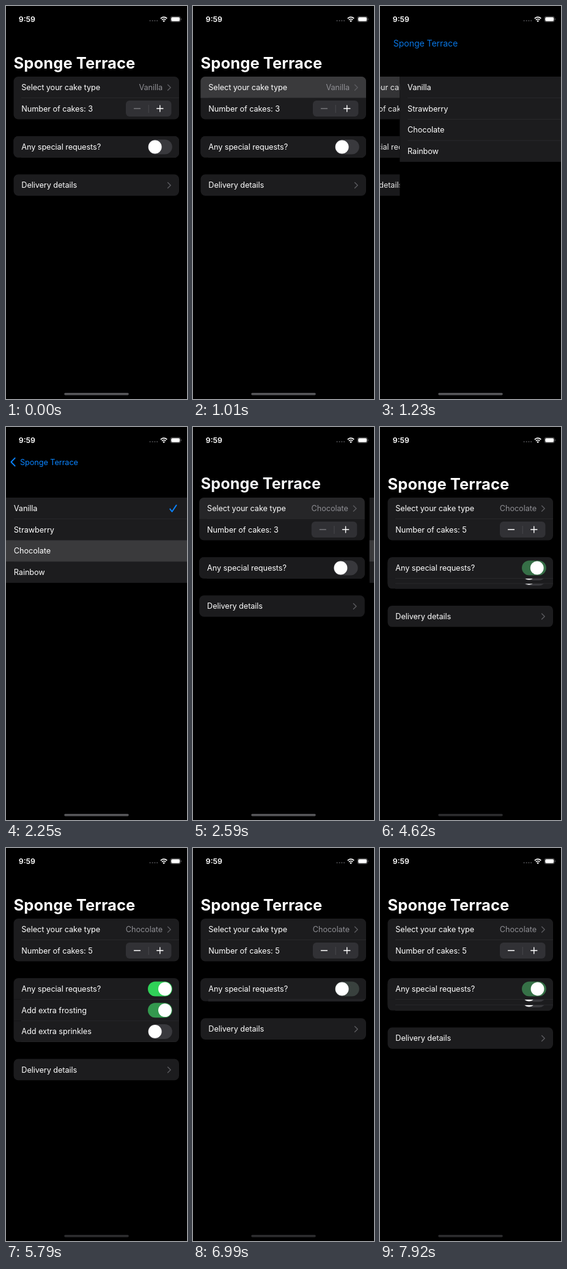
These frames come from a looping animation (296x640 px, 8000 ms). An HTML page:

```html
<!DOCTYPE html>
<html lang="en">
<head>
<meta charset="utf-8">
<title>Cake order form</title>
<style>
  html, body { margin: 0; width: 100%; height: 100%; overflow: hidden; background: #000; }
  svg { display: block; width: 296px; height: 640px; font: 12.7px Inter, "Liberation Sans", sans-serif; letter-spacing: -.07px; }
  text { fill: #fff; white-space: pre; }
  .card { fill: #1c1c1e; }
  .lit { fill: #3a3a3c; }
  .line { fill: #2b2b2e; }
  .value { fill: #8e8e93; text-anchor: end; }
  .stroke { fill: none; stroke-linecap: round; stroke-linejoin: round; stroke-width: 1.4; }
  .more { stroke: #5c5c60; }
  .blue { stroke: #0a84ff; stroke-width: 1.9; }
  #back { fill: #0a84ff; }
  #large { font-size: 25.5px; font-weight: 700; letter-spacing: .1px; }
  .clock { font-size: 12.3px; font-weight: 600; letter-spacing: 0; }
</style>
</head>
<body>
<svg viewBox="0 0 296 640">
  <defs>
    <clipPath id="topClip"><rect x="12.5" y="115" width="270.5" height="69.4" rx="7.5"/></clipPath>
    <clipPath id="extraClip"><rect id="extraBox" x="12.5" y="212" width="270.5" height="34.7" rx="7.5"/></clipPath>
    <path id="more" class="stroke more" d="M264.6 13.2l4.6 4.5-4.6 4.5"/>
  </defs>

  <g id="home">
    <g clip-path="url(#topClip)">
      <rect class="card" y="115" width="296" height="70"/>
      <rect id="homeLit" class="lit" y="115" width="296" height="34.7"/>
      <rect class="line" x="25" y="149.2" width="258" height=".8"/>
    </g>
    <text x="25.3" y="137">Select your cake type</text>
    <text id="cake" class="value" x="256" y="137"></text>
    <use href="#more" y="115"/>
    <text id="count" x="25.3" y="171.7"></text>
    <rect x="196" y="154" width="74.5" height="26" rx="6" fill="#313135"/>
    <rect x="232.7" y="161" width="1" height="13" fill="#49494d"/>
    <rect id="plusLit" x="235.5" y="156.5" width="32.2" height="21" rx="5" fill="#48484c"/>
    <path id="minus" class="stroke" stroke="#fff" d="M209.5 167h10"/>
    <path class="stroke" stroke="#fff" d="M246.7 167h10.2m-5.1-5.1v10.2"/>

    <g id="extras" clip-path="url(#extraClip)"></g>

    <g id="delivery">
      <rect class="card" x="12.5" width="270.5" height="34.7" rx="7.5"/>
      <text x="25.3" y="22">Delivery details</text>
      <use href="#more"/>
    </g>
  </g>

  <g id="picker">
    <rect y="49" width="296" height="575"/>
    <rect class="card" y="115" width="296" height="138.8"/>
    <rect id="pickLit" class="lit" y="184.4" width="296" height="34.7"/>
    <g id="options"></g>
    <path id="check" class="stroke blue" d="M268.3 18.6l3.3 4.2 7-10.4"/>
  </g>

  <text id="large">Sponge Terrace</text>
  <text id="back">Sponge Terrace</text>
  <path id="chevron" class="stroke blue" d="M14.6 50.6l-6.2 6.4 6.2 6.4"/>

  <text class="clock" x="20.8" y="26">9:59</text>
  <g fill="#4c4c4f">
    <circle cx="235.6" cy="24" r="1.1"/><circle cx="239.6" cy="24" r="1.1"/>
    <circle cx="243.4" cy="24" r="1.1"/><circle cx="247.2" cy="24" r="1.1"/>
  </g>
  <path d="M252.9 20.4a7.3 7.3 0 0 1 10.4 0M254.9 22.7a4.6 4.6 0 0 1 6.4 0" fill="none" stroke="#fff" stroke-width="1.7"/>
  <path d="M258.1 26.2l-1.8-1.9a2.5 2.5 0 0 1 3.6 0z" fill="#fff"/>
  <g transform="translate(.6 0)">
    <rect x="268.5" y="17.2" width="16.2" height="8.6" rx="2.6" fill="none" stroke="#6a6a6d" stroke-width=".8"/>
    <rect x="269.6" y="18.2" width="14" height="6.6" rx="1.7" fill="#fff"/>
    <path d="M285.8 20v3a1.8 1.8 0 0 0 0-3z" fill="#6a6a6d"/>
  </g>
  <rect id="bar" x="95.2" y="629.9" width="105.6" height="3.8" rx="1.9"/>
</svg>

<script>
  const LOOP = 8000, ROW = 34.7;
  const $ = id => document.getElementById(id);
  const set = (id, attrs) => { for (const k in attrs) $(id).setAttribute(k, attrs[k]); };
  const move = (id, x, y, s = 1) => set(id, { transform: `translate(${x} ${y}) scale(${s})` });
  const clamp = v => Math.min(1, Math.max(0, v));
  const mix = (a, b, p) => a + (b - a) * p;

  $('options').innerHTML = ['Vanilla', 'Strawberry', 'Chocolate', 'Rainbow'].map((name, i) => {
    const y = 115 + i * ROW;
    return `<text x="12.8" y="${y + 22}">${name}</text>` +
      (i ? `<rect class="line" x="13" y="${y - .4}" width="283" height=".8"/>` : '');
  }).join('');

  // Later rows come first, so that each slides out from under the one above.
  const toggles = { sprinkles: 'Add extra sprinkles', frosting: 'Add extra frosting', special: 'Any special requests?' };
  $('extras').innerHTML = Object.entries(toggles).map(([id, label]) => `
    <g id="${id}">
      <rect class="card" width="296" height="${ROW}"/>
      <rect id="${id}Line" class="line" x="25" y="34.2" width="258" height=".8"/>
      <text x="25.3" y="22">${label}</text>
      <rect id="${id}Track" x="232" y="5.5" width="39.8" height="24" rx="12"/>
      <rect id="${id}Knob" y="6.6" height="21.8" rx="10.9" fill="#fff"/>
    </g>`).join('');

  const bursts = [[1010, 1460, 5], [2250, 2250, 1], [2370, 2800, 5], [3360, 3360, 1], [3480, 3580, 2],
    [3750, 3960, 3], [4620, 5370, 8], [5470, 6230, 8], [6330, 6430, 2], [6770, 7210, 5], [7920, 7920, 1]];
  const ticks = bursts.flatMap(([from, to, n]) => Array.from({ length: n },
    (_, i) => n > 1 ? Math.floor((from + (to - from) * i / (n - 1)) / 10) * 10 : from));
  const hold = t => ticks.reduce((last, tick) => tick <= t ? tick : last, 0);

  function spring(ms) {
    if (ms <= 0) return 0;
    const k = ms * .018;
    return ms > 420 ? 1 : 1 - (1 + k) * Math.exp(-k);
  }

  const slide = ms => clamp(ms * .0155);
  const tintOn = ms => ms <= 0 ? 0 : 1 - .85 * Math.exp(-.0054 * ms);
  const tintOff = ms => ms <= 0 ? 0 : ms > 450 ? 1 : 1 - .8 * Math.exp(-.01 * ms);

  function drawSwitch(id, pos, tint, stretch = 0) {
    const rgb = [[57, 48], [57, 209], [61, 88]].map(([a, b]) => Math.round(mix(a, b, tint)));
    set(id + 'Track', { fill: `rgb(${rgb})` });
    set(id + 'Knob', { x: mix(232.8, 249, pos), width: 21.8 + stretch });
  }

  function drawNav(p) {
    const x = mix(12.5, 23, p), y = mix(102.1, 61.5, p);
    move('large', x, y, mix(1, .5, p));
    move('back', x, y, mix(2, 1, p));
    set('large', { opacity: clamp(1 - 1.5 * p) });
    set('back', { opacity: p });
    set('chevron', { opacity: clamp((p - .9) * 10) });
  }

  function drawPages(t) {
    const p = t < 2270 ? spring(t - 1020) : 1 - spring(t - 2270);
    const changed = t >= 2300;
    move('home', -88.8 * p, 0);
    move('picker', 296 * (1 - p), 0);
    set('home', { opacity: 1 - .1 * p });
    set('homeLit', { opacity: t < 1010 ? 0 : 1 - clamp((t - 2270) / 500) });
    set('pickLit', { opacity: t >= 2250 ? 1 : 0 });
    move('check', 0, 115 + (changed ? 2 * ROW : 0));
    $('cake').textContent = changed ? 'Chocolate' : 'Vanilla';
    drawNav(p);
  }

  function drawStepper(t) {
    const count = 3 + (t >= 3360) + (t >= 3750);
    const pressed = t >= 3750 ? 3750 : 3360;
    $('count').textContent = 'Number of cakes: ' + count;
    set('minus', { stroke: count > 3 ? '#fff' : '#77777b' });
    set('plusLit', { opacity: t < pressed ? 0 : clamp(1 - (t - pressed) / 200) });
  }

  function drawExtras(t) {
    const reopened = t >= 7865;
    const on = reopened ? 7865 : 4568, off = 6717, frost = 5637;
    const closing = t > off && !reopened;
    const open = closing ? 1 - spring(t - off) : spring(t - on);
    ['special', 'frosting', 'sprinkles'].forEach((id, i) => move(id, 0, 212 + i * ROW * open));
    set('extraBox', { height: ROW * (1 + 2 * open) });
    set('specialLine', { opacity: open ? 1 : 0 });
    move('delivery', 0, 274.2 + 2 * ROW * open);

    if (closing) {
      const pos = 1 - slide(t - off), tint = 1 - tintOff(t - off);
      drawSwitch('special', pos, tint);
      drawSwitch('frosting', pos, tint);
    } else {
      const since = reopened ? 0 : t - frost;
      drawSwitch('special', slide(t - on), tintOn(t - on));
      drawSwitch('frosting', slide(since), tintOn(since), t >= 5470 && t < frost ? 3.5 : 0);
    }
    drawSwitch('sprinkles', 0, 0);
    set('bar', { fill: t < 4620 ? '#555558' : '#2c2c2e' });
  }

  function draw(now) {
    const t = hold(now % LOOP);
    drawPages(t);
    drawStepper(t);
    drawExtras(t);
    requestAnimationFrame(draw);
  }

  draw(0);
</script>
</body>
</html>
```
